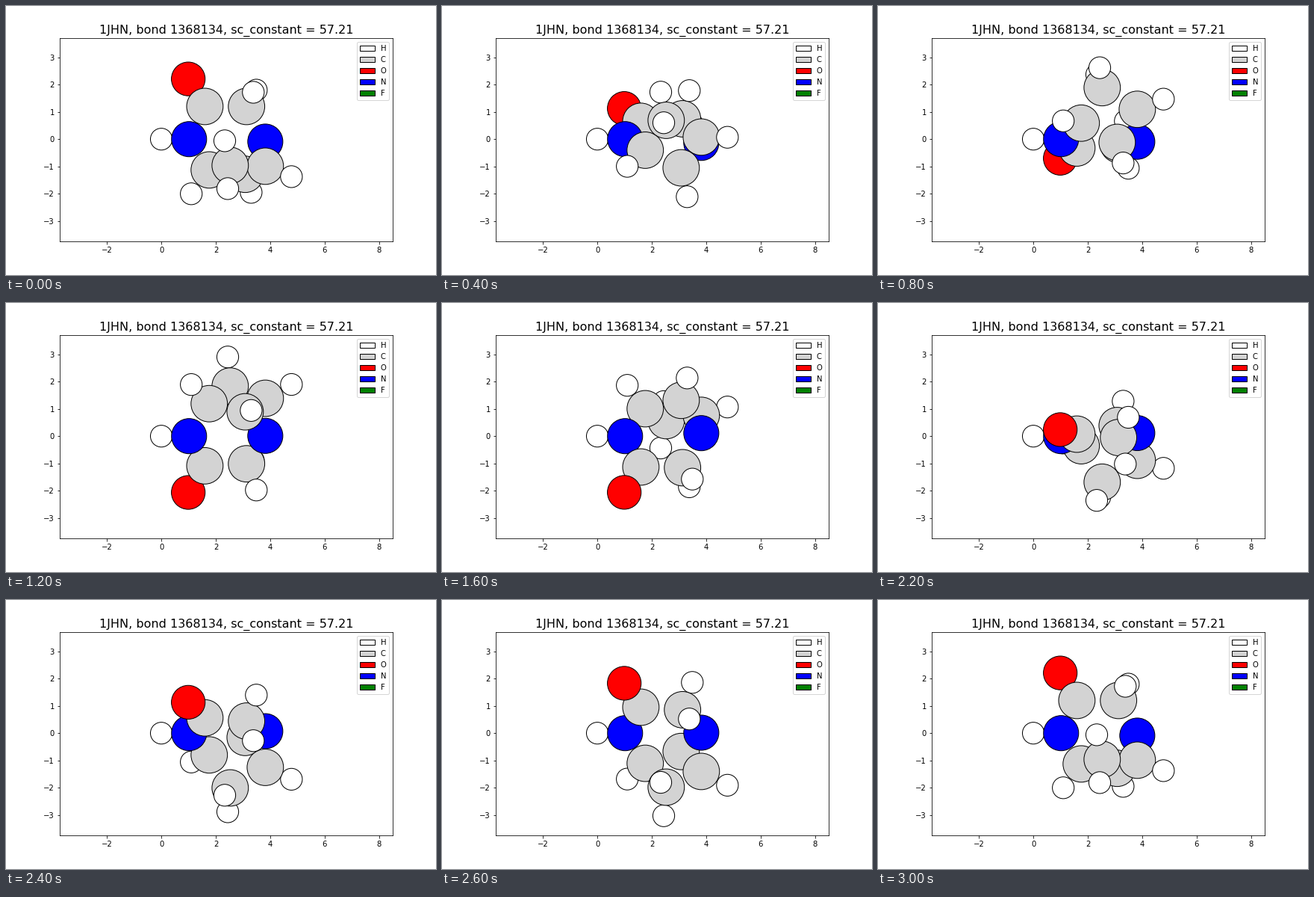
Write a matplotlib script that moves like this. It is 576 px wide and 360 px high and loops after 3.2 s.

```python
import numpy as np
import matplotlib.pyplot as plt
from matplotlib.animation import FuncAnimation
from matplotlib.patches import Circle, Patch

FRAMES = 16
SCALE = 36.46  # pixels per unit

COLORS = {"H": "white", "C": "lightgray", "O": "red", "N": "blue", "F": "green"}
SIZES = {"H": 0.25, "C": 0.70, "O": 0.60, "N": 0.65}

# element, x, y, z
ATOMS = [
    ("H", 0.00, 0.000, 0.000),
    ("N", 1.02, 0.000, 0.000),
    ("O", 0.99, 2.210, 0.474),
    ("C", 1.60, 1.200, 0.200),
    ("C", 3.13, 1.200, 0.075),
    ("N", 3.82, -0.090, 0.105),
    ("C", 1.76, -1.130, -0.473),
    ("H", 1.10, -2.005, -0.463),
    ("C", 2.53, -0.965, -1.800),
    ("H", 2.44, -1.816, -2.445),
    ("H", 2.33, -0.060, -2.377),
    ("C", 3.08, -1.290, 0.255),
    ("H", 3.30, -1.953, 1.085),
    ("C", 3.82, -0.993, -0.997),
    ("H", 4.78, -1.377, -1.332),
    ("H", 3.49, 1.800, 0.885),
    ("H", 3.38, 1.720, -0.849),
]

fig = plt.figure(figsize=(8, 5), dpi=72, facecolor="white")
fig.subplots_adjust(left=0.125, right=0.9, bottom=0.125, top=0.88)
ax = fig.add_subplot()

half_w = 0.775 * 576 / SCALE / 2
half_h = 0.755 * 360 / SCALE / 2
ax.set_xlim(2.39 - half_w, 2.39 + half_w)
ax.set_ylim(-0.025 - half_h, -0.025 + half_h)
ax.set_xticks(range(-2, 9, 2))
ax.set_yticks(range(-3, 4))
ax.set_title("1JHN, bond 1368134, sc_constant = 57.21", fontsize=16)
ax.legend(
    handles=[Patch(facecolor=c, edgecolor="black", label=e) for e, c in COLORS.items()],
    loc="upper right",
)

xs, ys, zs = np.array([atom[1:] for atom in ATOMS]).T
circles = [
    ax.add_patch(Circle((x, y), 0.8 * np.sqrt(SIZES[e]), facecolor=COLORS[e],
                        edgecolor="black", linewidth=1))
    for e, x, y, _ in ATOMS
]


def update(i):
    """Turn the molecule about the x axis and restack by depth."""
    angle = 2 * np.pi * i / (FRAMES - 1)
    y = ys * np.cos(angle) - zs * np.sin(angle)
    depth = ys * np.sin(angle) + zs * np.cos(angle)
    for rank, k in enumerate(np.argsort(-depth, kind="stable")):
        circles[k].center = (xs[k], y[k])
        circles[k].set_zorder(1 + 0.01 * rank)
    return circles


anim = FuncAnimation(fig, update, frames=FRAMES, interval=200, repeat=True,
                     repeat_delay=0, blit=False)
plt.show()
```
